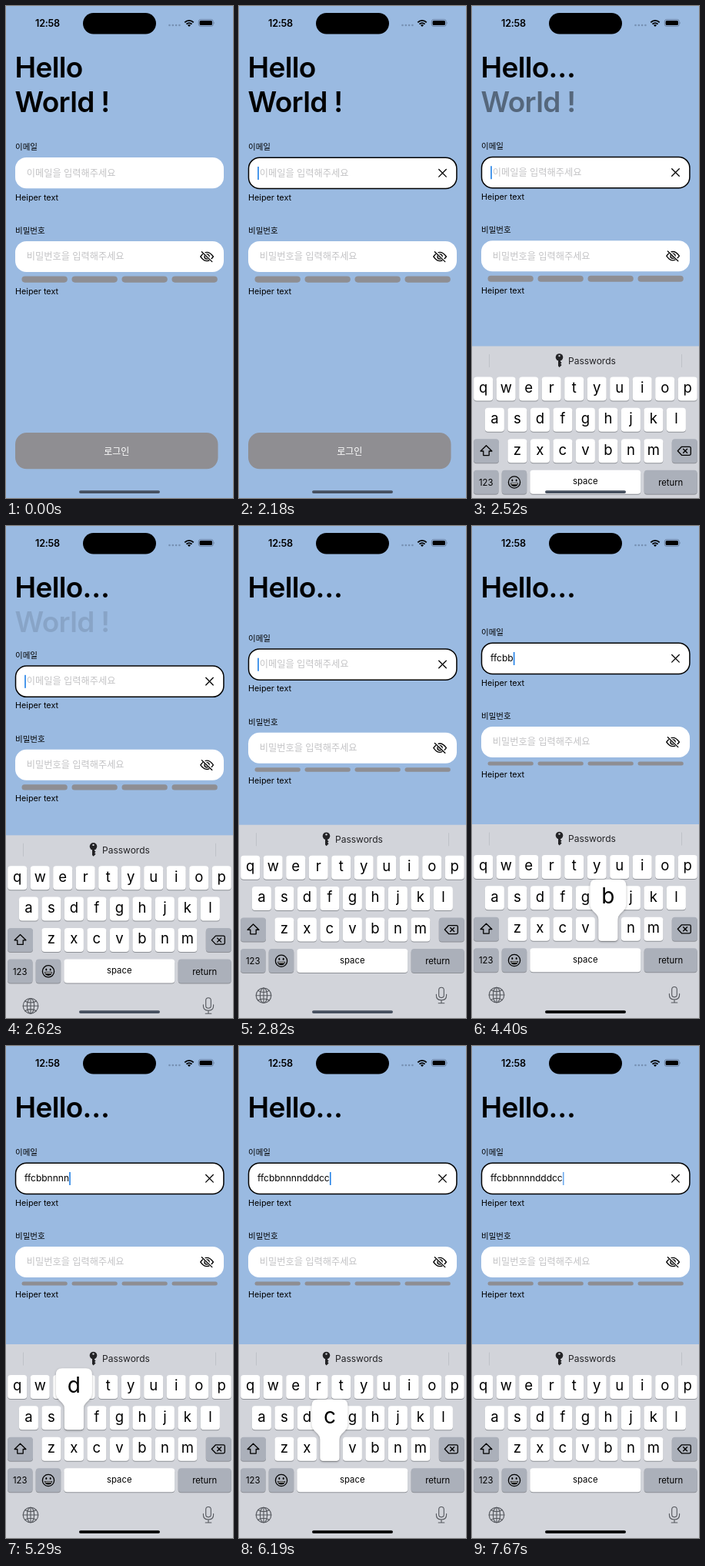
Write an HTML page that moves like this. It is 295 px wide and 640 px high and loops after 8000 ms.

```html
<!DOCTYPE html>
<html lang="ko">
<head>
<meta charset="utf-8">
<title>Login form</title>
<style>
  html, body { margin: 0; width: 100%; height: 100%; overflow: hidden; background: #9abae1; }
  svg { display: block; width: 295px; height: 640px; }
  text { font-family: Inter, "Noto Sans CJK KR", "Noto Sans CJK", sans-serif; white-space: pre; }
  .mid { text-anchor: middle; }
  .title { font-size: 37px; font-weight: 600; letter-spacing: -.65px; }
  .clock { font-size: 12.6px; font-weight: 600; letter-spacing: -.2px; }
  .label { font-size: 10.5px; }
  .helper { font-size: 10.8px; }
  .hint { font-size: 12.2px; fill: #c3c3c5; }
  .typed { font-size: 12px; }
  .login { font-size: 12px; fill: #fff; }
  .letter { font-size: 18.5px; }
  .big { font-size: 28px; }
  .small { font-size: 11.3px; }
  .line { fill: none; stroke: #000; stroke-width: 1.3; stroke-linecap: round; stroke-linejoin: round; }
  .soft { stroke: #53565c; stroke-width: 1.1; }
  #pop { filter: drop-shadow(0 1px 1.5px rgba(0, 0, 0, .28)); }
</style>
</head>
<body>
<svg viewBox="0 0 295 640">
  <rect width="295" height="640" fill="#9abae1"/>

  <!-- status bar -->
  <text class="clock mid" x="54" y="26.6">12:58</text>
  <rect x="100" y="9" width="95" height="27.5" rx="13.7"/>
  <path d="M212.5 25H226" stroke="#7690b2" stroke-width="2.6" stroke-linecap="round" stroke-dasharray="0 4.3"/>
  <g fill="none" stroke="#000" stroke-width="1.9">
    <path d="M232.3 21.3a8 8 0 0 1 11.4 0M234.5 23.6a4.9 4.9 0 0 1 7 0"/>
    <path d="M238 27l-2-2.1a2.9 2.9 0 0 1 4 0z" fill="#000" stroke="none"/>
  </g>
  <rect x="250.3" y="17.6" width="19" height="8.8" rx="2.7" fill="none" stroke="#5d7290" stroke-width=".8"/>
  <rect x="251.6" y="18.9" width="16.4" height="6.2" rx="1.6"/>
  <path d="M270.3 20.5q1.3 1.5 0 3z" fill="#5d7290"/>

  <text class="title" id="hello" x="11.5" y="92.5">Hello</text>
  <text class="title" id="world" x="11.5" y="137.5">World !</text>

  <rect x="12" y="555" width="263.5" height="47.3" rx="15" fill="#8f8e92"/>
  <text class="login mid" x="143.7" y="583.5">로그인</text>

  <g id="form">
    <text class="label" x="12" y="187">이메일</text>
    <rect x="12" y="197" width="271" height="40.3" rx="14.5" fill="#fff"/>
    <text class="hint" id="hint" x="26.8" y="221.6">이메일을 입력해주세요</text>
    <text class="typed" id="typed" x="24" y="221.4"></text>
    <g id="focus">
      <rect class="line" x="12.5" y="197.2" width="270.4" height="40.3" rx="14.3" style="stroke-width:1.5"/>
      <path class="line" d="M259.7 212.5l9.6 9.6m0-9.6l-9.6 9.6"/>
      <rect id="caret" y="209" width="1.6" height="17" fill="#1f7fe6"/>
    </g>
    <text class="helper" x="12" y="252.5">Heiper text</text>

    <text class="label" x="12" y="296">비밀번호</text>
    <rect x="12" y="306" width="271" height="40" rx="14.5" fill="#fff"/>
    <text class="hint" x="26.8" y="330.4">비밀번호을 입력해주세요</text>
    <path class="line" d="M252.8 326q8.3-11.4 16.6 0q-8.3 11.4-16.6 0z"/>
    <circle class="line" cx="261" cy="326" r="3.1"/>
    <circle cx="261" cy="326" r="1.5"/>
    <path d="M254.9 319.2l13.4 13.4" stroke="#fff" stroke-width="3"/>
    <path class="line" d="M254.4 319.8l13.4 12.8"/>
    <g id="bars" fill="#8e8e93"></g>
    <text class="helper" id="helper2" x="12">Heiper text</text>
  </g>

  <g id="keyboard">
    <rect y="388" width="295" height="252" fill="#d2d4da"/>
    <path d="M22.5 398.5v17M272.5 398.5v17" stroke="#bfc2c8"/>
    <circle cx="113.5" cy="402.5" r="4.8" fill="#232326"/>
    <path d="M112 406h3v1.9l1.6 1.5-1.5 1.5 1.5 1.5-3 3-1.6-1.6z" fill="#232326"/>
    <circle cx="113.5" cy="400.6" r="1.2" fill="#d2d4da"/>
    <text x="125" y="411.3" font-size="12" fill="#232326">Passwords</text>
    <g id="keys"></g>

    <path class="line" d="M18.5 517.2l7.4 7.3h-3.7v5.6h-7.4v-5.6h-3.7z"/>
    <path class="line" d="M272.5 518.8h10q1.8 0 1.8 1.8v7.4q0 1.8-1.8 1.8h-10l-5.2-5.5z M274.6 521.8l5 5m0-5l-5 5"/>
    <circle class="line" cx="55" cy="565" r="7.6"/>
    <ellipse cx="52.3" cy="562.6" rx="1" ry="1.5"/>
    <ellipse cx="57.7" cy="562.6" rx="1" ry="1.5"/>
    <path d="M50 566h10q-.8 4.6-5 4.6t-5-4.6z"/>
    <path d="M51.2 566.7h7.6v1h-7.6z" fill="#fff"/>

    <g class="line soft">
      <circle cx="32" cy="610" r="9.8"/>
      <ellipse cx="32" cy="610" rx="4.6" ry="9.8"/>
      <path d="M32 600.2v19.6M22.2 610h19.6M24.6 603.6q7.4 4.2 14.8 0M24.6 616.4q7.4-4.2 14.8 0"/>
      <rect x="259.7" y="599.5" width="6.6" height="13.4" rx="3.3"/>
      <path d="M256.4 608.5v1.5q0 6 6.6 6t6.6-6v-1.5M263 616v4M259.2 620h7.6"/>
    </g>

    <g id="pop">
      <path fill="#fff" d="M-15.5-49h31q8 0 8 8v24q0 5-4 9l-4 4q-3 3-3 7v24q0 4-4 4h-17q-4 0-4-4v-24q0-4-3-7l-4-4q-4-4-4-9v-24q0-8 8-8z"/>
      <text class="big mid" id="popLetter" y="-17.5"></text>
    </g>
  </g>

  <rect id="home" x="95" y="630.2" width="105" height="3.8" rx="1.9"/>
</svg>

<script>
const LOOP = 8000, FULL = 'ffcbbnnnndddcc';
const PITCH = 29.5, ROWS = [['qwertyuiop', 14.7, 428], ['asdfghjkl', 29.4, 468.3], ['zxcvbnm', 58.9, 508.8]];

// [time, typed length, key held down]
const TYPING = [
  [0, 0, ''], [3560, 0, 'f'], [3670, 1, 'f'], [3810, 2, 'f'], [3920, 2, ''],
  [4040, 2, 'c'], [4160, 3, 'c'], [4280, 4, 'b'], [4400, 5, 'b'],
  [4540, 5, 'n'], [4670, 6, 'n'], [4820, 7, 'n'], [4940, 9, 'n'],
  [5290, 9, 'd'], [5400, 10, 'd'], [5590, 11, 'd'], [5730, 12, 'd'], [5840, 12, ''],
  [5960, 12, 'c'], [6070, 13, 'c'], [6190, 14, 'c'], [6690, 14, '']
];
const CARET = [[0, 1], [3320, 0], [3560, 1], [7310, .45], [7450, 0], [7670, .65]];
const STEPS = [0, 2180, 2310, 2420, 2520, 2620, 2720, 2820, 2920, 3020, 3130].map(t => [t]);

const $ = id => document.getElementById(id);
const at = (list, t) => list.findLast(e => e[0] <= t);
const spring = (ms, rate) => {
  const x = Math.max(0, ms) / 1000 * rate;
  return 1 - (1 + x) * Math.exp(-x);
};
const smooth = x => {
  x = Math.min(1, Math.max(0, x));
  return x * x * (3 - 2 * x);
};

const keyPos = {};
function key(x, y, w, fill, label = '', cls = 'small', base = 20) {
  const rect = (dy, color) => `<rect x="${x}" y="${y + dy}" width="${w}" height="31" rx="4" fill="${color}"/>`;
  return rect(1, '#8d9096') + rect(0, fill) +
    `<text class="${cls} mid" x="${x + w / 2}" y="${y + base}">${label}</text>`;
}
function buildKeys() {
  let out = '';
  for (const [letters, x0, y] of ROWS) {
    [...letters].forEach((c, i) => {
      const cx = x0 + i * PITCH;
      keyPos[c] = [cx, y];
      out += key(cx - 12.5, y, 25, '#fff', c, 'letter', 20.3);
    });
  }
  const gray = '#abb0ba';
  out += key(2, 508.8, 33, gray) + key(259.8, 508.8, 33, gray);
  out += key(2, 549.3, 32.5, gray, '123') + key(38.7, 549.3, 32.5, gray);
  out += key(75.3, 549.3, 144, '#fff', 'space', 'small', 18.5) + key(223.7, 549.3, 69, gray, 'return');
  $('keys').innerHTML = out;
}
function buildBars() {
  $('bars').innerHTML = [0, 1, 2, 3].map(i =>
    `<rect x="${20.5 + i * 65}" y="351.5" width="59.3"/>`).join('');
}

function draw(t) {
  const s = at(STEPS, t)[0];
  const lift = s >= 3130 ? 1 : spring(s - 2500, 10);
  const rise = s >= 2920 ? 1 : spring(s - 2350, 17);
  const fade = smooth((s - 2310) / 390);

  $('hello').textContent = fade > 0 ? 'Hello…' : 'Hello';
  $('world').setAttribute('opacity', 1 - fade);
  $('form').setAttribute('transform', `translate(0 ${-45 * lift})`);
  const barHeight = 8.2 - 3.2 * lift;
  for (const bar of $('bars').children) {
    bar.setAttribute('height', barHeight);
    bar.setAttribute('rx', barHeight / 2);
  }
  $('helper2').setAttribute('y', 374.7 - 3.2 * lift);
  $('keyboard').setAttribute('transform', `translate(0 ${252 * (1 - rise)})`);
  $('focus').setAttribute('visibility', t >= 2180 ? 'visible' : 'hidden');

  const [, count, held] = at(TYPING, t);
  $('typed').textContent = FULL.slice(0, count);
  $('hint').setAttribute('visibility', count ? 'hidden' : 'visible');
  $('caret').setAttribute('x', 24.2 + (count ? $('typed').getComputedTextLength() : 0));
  $('caret').setAttribute('opacity', at(CARET, t)[1]);

  $('pop').setAttribute('visibility', held ? 'visible' : 'hidden');
  if (held) {
    $('pop').setAttribute('transform', `translate(${keyPos[held]})`);
    $('popLetter').textContent = held;
  }
  $('home').setAttribute('fill', t >= 4040 ? '#000' : '#46505f');
}

buildKeys();
buildBars();
const start = performance.now();
function tick() {
  draw((performance.now() - start) % LOOP);
  requestAnimationFrame(tick);
}
tick();
</script>
</body>
</html>
```
